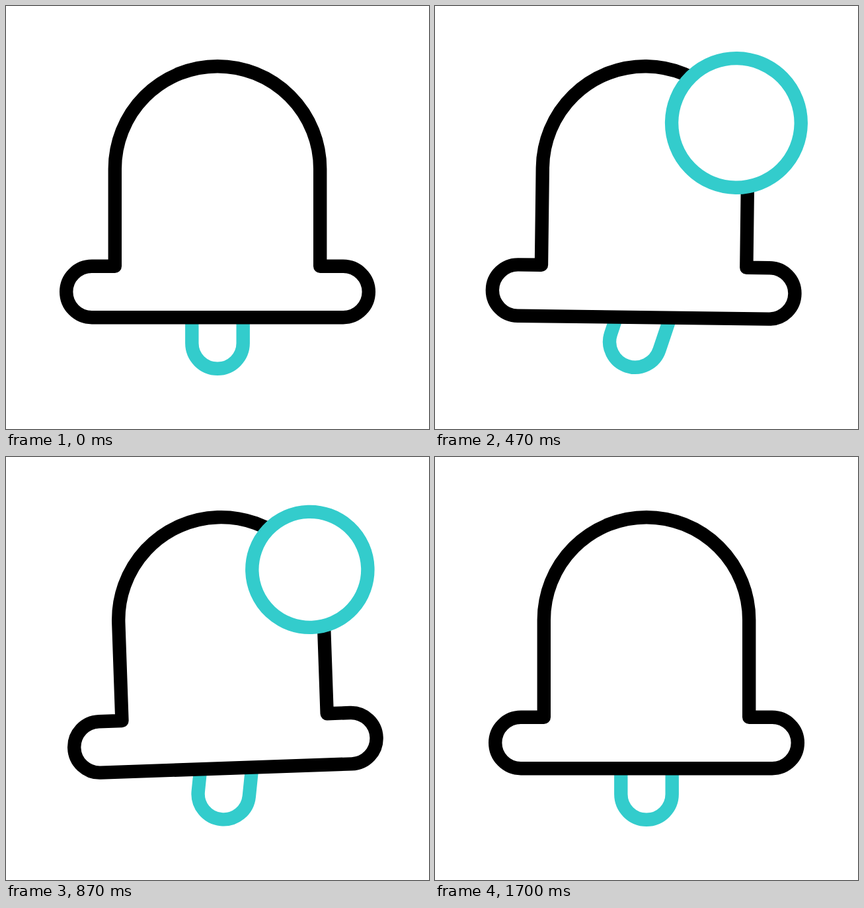
Write an HTML page without scripts that moves like this. It is 640 px wide and 640 px high and loops after 2 s.

```html
<!DOCTYPE html>
<html lang="en">
<head>
<meta charset="utf-8">
<title>Ringing bell</title>
<style>
@property --t {
  syntax: "<number>";
  inherits: true;
  initial-value: 0;
}

html, body {
  margin: 0;
  width: 100%;
  height: 100%;
  overflow: hidden;
  background: #fff;
}

/* --t counts 30 ticks per second */
svg {
  display: block;
  width: 100vw;
  height: 100vh;
  animation: tick 2s steps(60) -4ms infinite;
}

@keyframes tick {
  from { --t: 0; }
  to { --t: 60; }
}

path, circle {
  fill: #fff;
  stroke: #33cccc;
  stroke-width: 20.4px;
  stroke-linejoin: round;
}

/* Each phase runs from 1 to -1 along a cosine; swings add up to zero */
.bell {
  --p1: cos(180deg * clamp(0, var(--t) / 10, 1));
  --p2: cos(180deg * clamp(0, (var(--t) - 10) / 7, 1));
  --p3: cos(180deg * clamp(0, (var(--t) - 17) / 5, 1));
  --p4: cos(180deg * clamp(0, (var(--t) - 22) / 4, 1));
  --p5: cos(180deg * clamp(0, (var(--t) - 26) / 4, 1));
  transform-origin: 320px 91.2px;
  transform: rotate(calc(-.5deg * (13.05 * var(--p1) - 20.15 * var(--p2)
    + 11.3 * var(--p3) - 6.2 * var(--p4) + 2 * var(--p5))));
}

.clapper {
  --p1: cos(180deg * clamp(0, var(--t) / 11, 1));
  --p2: cos(180deg * clamp(0, (var(--t) - 11) / 9, 1));
  --p3: cos(180deg * clamp(0, (var(--t) - 20) / 7, 1));
  --p4: cos(180deg * clamp(0, (var(--t) - 27) / 5, 1));
  --p5: cos(180deg * clamp(0, (var(--t) - 32) / 5, 1));
  --p6: cos(180deg * clamp(0, (var(--t) - 37) / 5, 1));
  --p7: cos(180deg * clamp(0, (var(--t) - 42) / 5, 1));
  transform-origin: 320px 471.2px;
  transform: rotate(calc(-.5deg * (28.5 * var(--p1) - 42.9 * var(--p2)
    + 23.4 * var(--p3) - 16 * var(--p4) + 14.3 * var(--p5)
    - 9.8 * var(--p6) + 2.5 * var(--p7))));
}

.body { stroke: #000; }

.badge {
  --p1: cos(180deg * clamp(0, (var(--t) - 7) / 9, 1));
  --p2: cos(180deg * clamp(0, (var(--t) - 16) / 6, 1));
  --p3: cos(180deg * clamp(0, (var(--t) - 22) / 10, 1));
  --fade: cos(90deg * clamp(0, (var(--t) - 42) / 9, 1));
  --size: calc(49.6 - .5 * (110.8 * var(--p1) - 29.4 * var(--p2) + 17.8 * var(--p3)));
  r: max(0px, 1px * var(--size) * var(--fade) - .01px);
}
</style>
</head>
<body>
<svg viewBox="0 0 640 640">
  <g class="bell">
    <path class="clapper" d="M281.3 425V510.1a38.7 38.7 0 0 0 77.4 0V425"/>
    <path class="body" d="M164.8 393.8V246.4a155.2 155.2 0 0 1 310.4 0V393.8H510.1a38.7 38.7 0 0 1 0 77.4H129.9a38.7 38.7 0 0 1 0-77.4Z"/>
    <circle class="badge" cx="457" cy="175.2" r="0"/>
  </g>
</svg>
</body>
</html>
```
